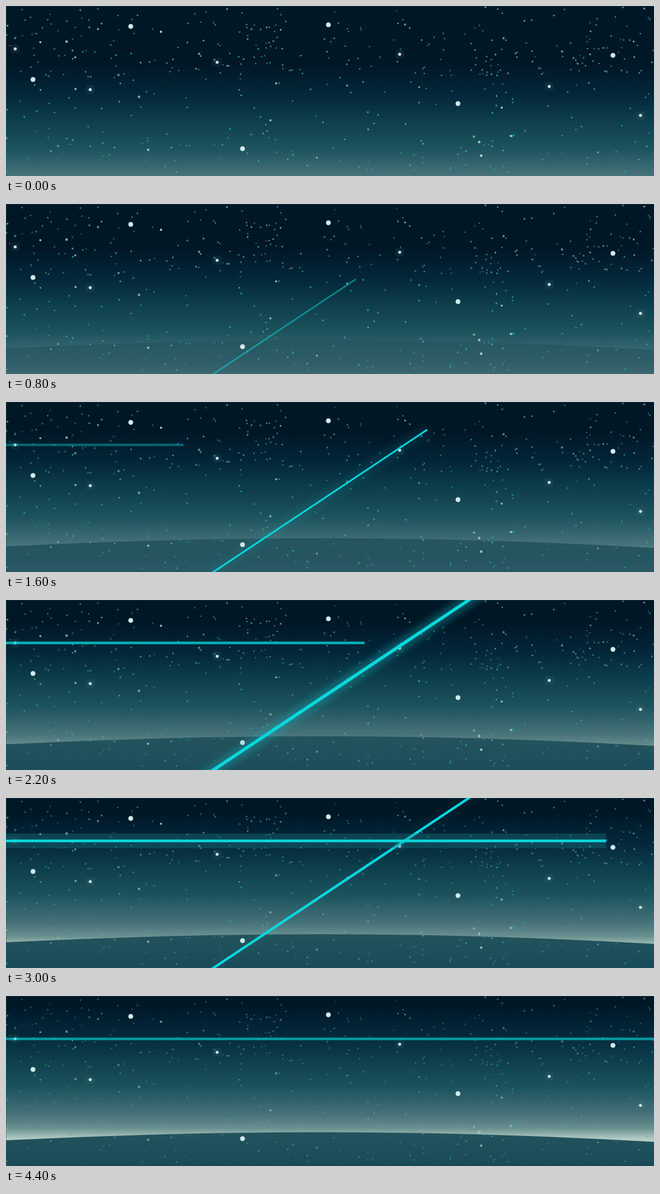
An HTML page that plays this animation: 1200 by 317 pixels, repeating every 4.5 s.

```html
<!DOCTYPE html>
<html lang="en">
<head>
<meta charset="utf-8">
<title>Night sky</title>
<style>
  html, body { margin: 0; width: 100%; height: 100%; overflow: hidden; background: #001726; }
  svg { display: block; width: 100%; height: 100%; }
</style>
</head>
<body>
<svg viewBox="0 0 1200 317" preserveAspectRatio="none">
  <defs>
    <linearGradient id="sky" gradientUnits="userSpaceOnUse" x1="0" y1="110" x2="0" y2="362">
      <stop offset="0" stop-color="#001726"/>
      <stop offset=".24" stop-color="#04293b"/>
      <stop offset=".42" stop-color="#0e3f4c"/>
      <stop offset=".62" stop-color="#1d535d"/>
      <stop offset=".82" stop-color="#47727a"/>
      <stop offset=".92" stop-color="#6b918f"/>
      <stop offset="1" stop-color="#b4ccc6"/>
    </linearGradient>
    <linearGradient id="ground" gradientUnits="userSpaceOnUse" x1="0" y1="254" x2="0" y2="317">
      <stop offset="0" stop-color="#23535c"/>
      <stop offset="1" stop-color="#194a58"/>
    </linearGradient>
    <filter id="soft" filterUnits="userSpaceOnUse" x="300" y="-80" width="680" height="480">
      <feGaussianBlur stdDeviation="7"/>
    </filter>
  </defs>
  <rect width="1200" height="317" fill="url(#sky)"/>
  <path id="hill" d="M0 269Q300 254 590 254T1200 272V317H0Z" fill="url(#ground)"/>
  <g id="dust"></g>
  <g id="stars"></g>
  <path d="M0 .5H1200M.5 0V317" fill="none" stroke="#0f5260" opacity=".45"/>
  <g id="beam" fill="none">
    <path id="beamGlow" stroke="#14a5ae" stroke-width="22" filter="url(#soft)"/>
    <path id="beamCore" stroke="#08d8de"/>
  </g>
  <g id="ray">
    <rect id="rayGlow" fill="#1d8791"/>
    <rect id="rayCore" fill="#08d8de"/>
  </g>
</svg>
<script>
const LOOP = 4500, STEP = 100;
const $ = id => document.getElementById(id);
const set = (el, attrs) => {
  for (const key in attrs) el.setAttribute(key, attrs[key]);
  return el;
};
const add = (parent, tag, attrs) =>
  parent.appendChild(set(document.createElementNS('http://www.w3.org/2000/svg', tag), attrs));
const clamp = v => Math.min(1, Math.max(0, v));
const pulse = (t, peak, width) => Math.exp(-(((t - peak) / width) ** 2));

let seed = 41;
const rand = () => (seed = (seed * 16807) % 2147483647) / 2147483647;
const pick = list => list[Math.floor(rand() * list.length)];

function star(parent, x, y, r, fill, opacity = 1) {
  add(parent, 'circle', { cx: x, cy: y, r, fill, opacity });
}

const tints = ['#3f929b', '#5b9fa6', '#1fb0b5', '#7db5b8'];
function scatter(count, x, y, w, h, r = 1.3, colors = tints) {
  while (count--) {
    star($('dust'), x + rand() * w, y + rand() * h, r + rand() * .5, pick(colors), .5 + rand() * .5);
  }
}

// Dense above, thinner in the middle, with a few clusters.
scatter(210, 0, 2, 1200, 132);
scatter(25, 430, 5, 85, 120);
scatter(22, 860, 80, 90, 50);
scatter(22, 1040, 75, 110, 50);
scatter(70, 0, 135, 1200, 95);
scatter(100, 0, 230, 1200, 80);
scatter(22, 0, 20, 1200, 265, 1.9, ['#b5dcde']);

for (const [x, y] of [[17, 80], [391, 105], [156, 156], [729, 90], [1006, 150], [1175, 204]]) {
  add($('stars'), 'rect', { x: x - 8, y: y - 8, width: 16, height: 16, rx: 4, fill: '#4a8590', opacity: .14 });
  star($('stars'), x, y, 2.8, '#d0e8e9');
}
for (const [x, y] of [[231, 38], [597, 35], [50, 137], [837, 182], [1124, 92], [438, 266]]) {
  star($('stars'), x, y, 4.5, '#d2eaeb');
}

function drawSky(t) {
  const rise = 95 * Math.sin(Math.PI / 2 * t / 4.4);
  set($('sky'), { gradientTransform: `translate(0 ${-rise})` });
  set($('hill'), { opacity: 1 - (1 - clamp(t / 3)) ** 3 });
  set($('dust'), { opacity: 1 - .08 * t });
}

function drawBeam(t) {
  const flare = pulse(t, 2.2, .55);
  const lineY = x => 317 - .67 * (x - 384);
  const tip = Math.min(900, 516 + 165 * t);
  const d = `M350 ${lineY(350)}L${tip} ${lineY(tip)}`;
  set($('beam'), { opacity: clamp(Math.min(t / 1.5, (4.4 - t) / 1.2)) });
  set($('beamCore'), { d, 'stroke-width': 2.8 + 1.7 * clamp((t - 1.6) / .6) + 1.4 * flare });
  set($('beamGlow'), { d, opacity: .42 * flare });
}

function drawRay(t) {
  const flare = pulse(t, 3.3, .7);
  const width = Math.min(1200, Math.max(0, 559 * (t - 1.012)));
  const band = (id, height, opacity) =>
    set($(id), { y: 80 - height / 2, width, height, opacity });
  set($('ray'), { opacity: clamp(Math.min((t - 1) / 1.5, (5.3 - t) / 1.4)) });
  band('rayCore', 4.3 + .8 * flare, 1);
  band('rayGlow', 6 + 26 * flare, .2 + .13 * flare);
}

const start = performance.now();
function tick() {
  const ms = (performance.now() - start) % LOOP;
  const t = Math.floor(ms / STEP) * STEP / 1000;
  drawSky(t);
  drawBeam(t);
  drawRay(t);
  requestAnimationFrame(tick);
}
tick();
</script>
</body>
</html>
```
